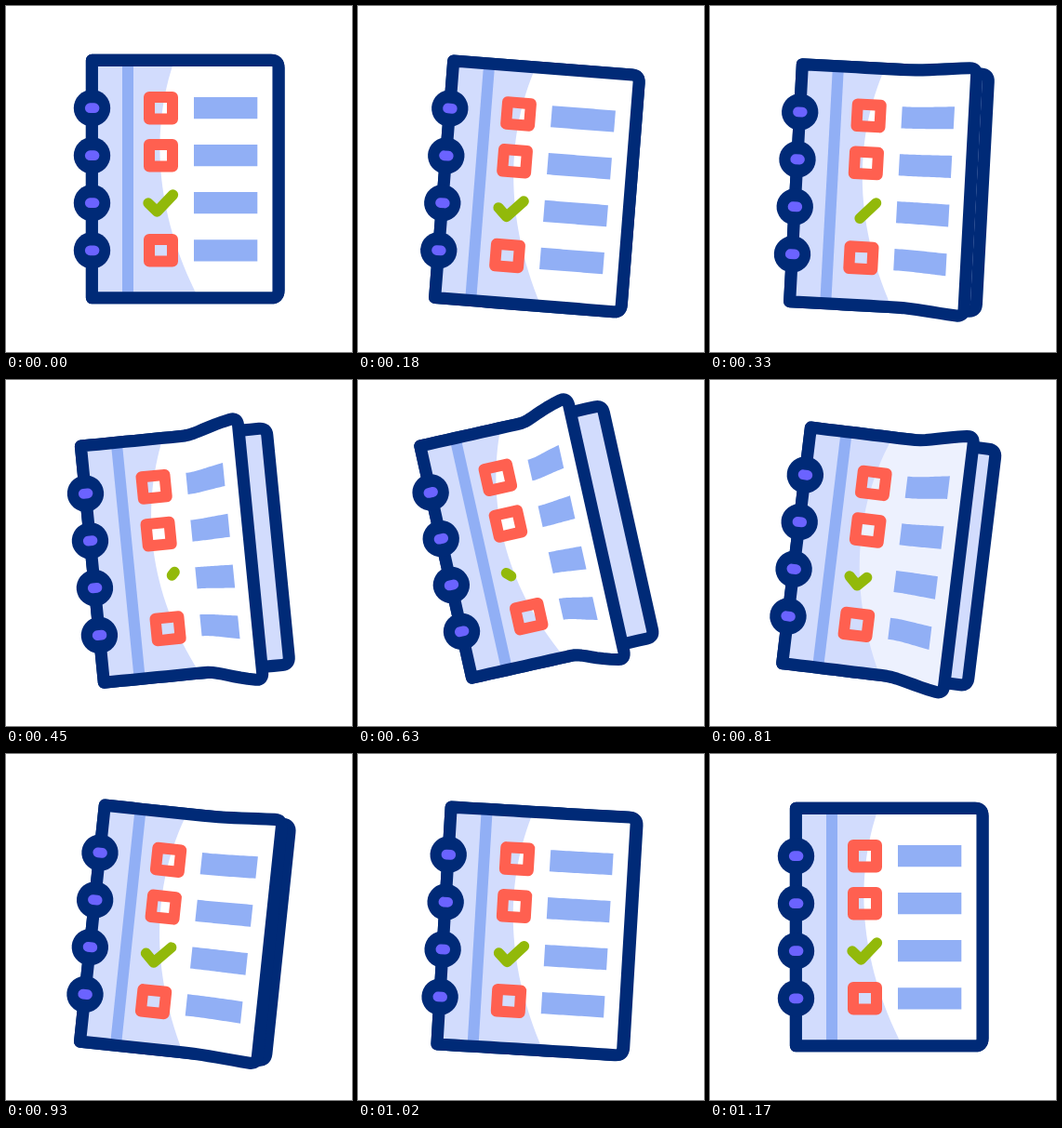
Write an HTML page with a canvas that moves like this. It is 372 px wide and 372 px high and loops after 1.5 s.

```html
<!DOCTYPE html>
<html lang="en">
<head>
<meta charset="utf-8">
<title>Checklist notebook</title>
<style>
html, body { margin: 0; width: 100%; height: 100%; overflow: hidden; background: #fff; }
canvas { display: block; width: 372px; height: 372px; }
</style>
</head>
<body>
<canvas id="stage" width="372" height="372"></canvas>
<script>
const ctx = document.getElementById('stage').getContext('2d');
const LOOP = 1500, STEP = 30, MID = 186;
const NAVY = '#002a77', SHADE = '#d2dcfd', BLUE = '#91aff5', RED = '#ff6050',
      GREEN = '#92b90a', PURPLE = '#6b63ff';
const LEFT = 92.4, RIGHT = 293, TOP = 58.4, BOTTOM = 313.8, FOLD = 202, OUTLINE = 13.1;
const ROWS = [109.7, 160.7, 211.7, 262.8];

// Each track is a list of [time, value] keys.
const tilt = [[60, 0], [180, 4.5], [250, 6.2], [450, -5.6], [600, -13], [630, -12.6],
              [810, 6.9], [850, 7.3], [930, 6], [1170, 0]];
const drop = [[60, 0], [180, 7.5], [270, 10.3], [450, 2.9], [600, -12], [630, -11],
              [810, 3], [930, 5.8], [1170, 0]];
const opening = [[190, 0], [300, .1], [450, .33], [600, .39], [630, .385],
                 [810, .275], [930, .1], [1050, 0]];
const erase = [[190, 0], [450, .88], [480, 1]];
const write = [[570, 0], [630, .16], [810, .7], [915, 1]];
const tint = [[680, 0], [800, .42], [900, 0]];

// Smooth interpolation that never overshoots its keys.
function at(keys, t) {
  const n = keys.length - 1;
  if (t <= keys[0][0]) return keys[0][1];
  if (t >= keys[n][0]) return keys[n][1];
  const rise = i => (keys[i + 1][1] - keys[i][1]) / (keys[i + 1][0] - keys[i][0]);
  const slope = i => {
    if (i === 0 || i === n) return 0;
    const a = rise(i - 1), b = rise(i);
    return a * b <= 0 ? 0 : 2 * a * b / (a + b);
  };
  let i = 0;
  while (t > keys[i + 1][0]) i++;
  const [t0, v0] = keys[i], [t1, v1] = keys[i + 1], d = t1 - t0, u = (t - t0) / d;
  const w = u * u * (3 - 2 * u);
  return v0 + (v1 - v0) * w + d * u * (1 - u) * ((1 - u) * slope(i) - u * slope(i + 1));
}

// Maps a point of the flat page onto the page lifted from the fold.
function bender(open) {
  const pull = (RIGHT - FOLD) * open, lift = .34 * open;
  return (x, y) => {
    const u = Math.max(0, (x - FOLD) / (RIGHT - FOLD));
    return [x - pull * Math.sin(u * Math.PI / 2),
            MID + (y - MID) * (1 + lift * u * u * (2 - u))];
  };
}

function bentLine(bend, x0, y0, x1, y1) {
  for (let i = 0; i <= 20; i++) {
    const u = i / 20;
    ctx.lineTo(...bend(x0 + (x1 - x0) * u, y0 + (y1 - y0) * u));
  }
}

function sheetPath(bend) {
  const r = 8;
  ctx.beginPath();
  bentLine(bend, LEFT, TOP, RIGHT - r, TOP);
  ctx.quadraticCurveTo(...bend(RIGHT, TOP), ...bend(RIGHT, TOP + r));
  ctx.lineTo(...bend(RIGHT, BOTTOM - r));
  ctx.quadraticCurveTo(...bend(RIGHT, BOTTOM), ...bend(RIGHT - r, BOTTOM));
  bentLine(bend, RIGHT - r, BOTTOM, LEFT, BOTTOM);
  ctx.closePath();
}

function stroke(color, width) {
  ctx.strokeStyle = color;
  ctx.lineWidth = width;
  ctx.stroke();
}

function fill(color) {
  ctx.fillStyle = color;
  ctx.fill();
}

function drawShading(open) {
  const shift = 33 * open;
  ctx.beginPath();
  ctx.moveTo(LEFT, TOP);
  ctx.lineTo(181, TOP);
  ctx.bezierCurveTo(156 - shift * .45, 130, 159 - shift, 220, 207 - shift, BOTTOM);
  ctx.lineTo(LEFT, BOTTOM);
  fill(SHADE);
  ctx.fillStyle = BLUE;
  ctx.fillRect(125, TOP, 12, BOTTOM - TOP);
}

function drawCheck(from, to) {
  const points = [[153, 212], [162.3, 221], [179.5, 203]];
  const arm = Math.hypot(9.3, 9), total = arm + Math.hypot(17.2, 18);
  const point = d => {
    const [a, b, u] = d < arm ? [points[0], points[1], d / arm]
                              : [points[1], points[2], (d - arm) / (total - arm)];
    return [a[0] + (b[0] - a[0]) * u, a[1] + (b[1] - a[1]) * u];
  };
  if (to - from < .005) return;
  ctx.beginPath();
  ctx.moveTo(...point(from * total));
  if (from * total < arm && to * total > arm) ctx.lineTo(...points[1]);
  ctx.lineTo(...point(to * total));
  stroke(GREEN, 11.3);
}

function drawRow(bend, y, index) {
  ctx.beginPath();
  bentLine(bend, FOLD, y - 11.6, 270.3, y - 11.6);
  bentLine(bend, 270.3, y + 11.6, FOLD, y + 11.6);
  fill(BLUE);
  if (index !== 2) {
    ctx.beginPath();
    ctx.rect(154, y - 11.8, 25, 23.6);
    stroke(RED, 12);
  }
}

function drawRing(y) {
  ctx.beginPath();
  ctx.arc(92.5, y, 19.7, 0, 2 * Math.PI);
  fill(NAVY);
  ctx.beginPath();
  ctx.moveTo(90.3, y);
  ctx.lineTo(95, y);
  stroke(PURPLE, 10.8);
}

function draw(t) {
  const open = at(opening, t), bend = bender(open);
  ctx.setTransform(1, 0, 0, 1, 0, 0);
  ctx.fillStyle = '#fff';
  ctx.fillRect(0, 0, 372, 372);
  ctx.lineCap = ctx.lineJoin = 'round';
  ctx.translate(MID, MID + at(drop, t));
  ctx.rotate(at(tilt, t) * Math.PI / 180);
  ctx.translate(-MID, -MID);

  sheetPath(bender(0));
  fill(SHADE);
  stroke(NAVY, OUTLINE);

  sheetPath(bend);
  fill('#fff');
  ctx.globalAlpha = at(tint, t);
  fill(SHADE);
  ctx.globalAlpha = 1;
  drawShading(open);
  ROWS.forEach((y, i) => drawRow(bend, y, i));
  if (t < 540) drawCheck(at(erase, t), 1);
  else drawCheck(0, at(write, t));
  sheetPath(bend);
  stroke(NAVY, OUTLINE);
  ROWS.forEach(drawRing);
}

const start = performance.now();
function tick() {
  const t = (performance.now() - start) % LOOP;
  draw(Math.floor(t / STEP) * STEP);
  requestAnimationFrame(tick);
}
tick();
</script>
</body>
</html>
```
